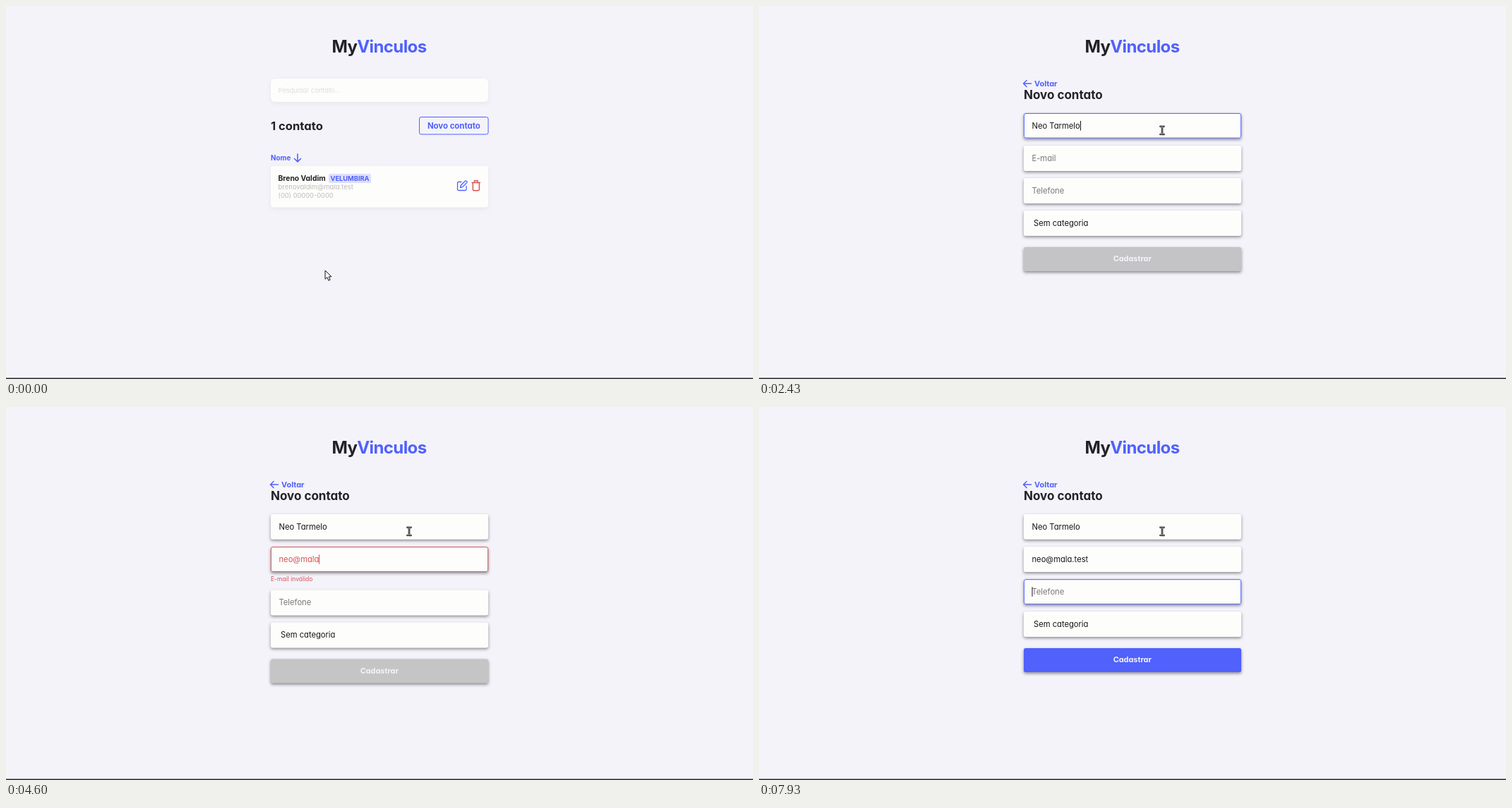
Recreate the animation shown at these times as an HTML page. Size 1058 by 529 pixels, loop 8 s.

```html
<!DOCTYPE html>
<html lang="pt-BR">
<head>
<meta charset="utf-8">
<title>Contatos</title>
<style>
  html, body { margin: 0; width: 100%; height: 100%; overflow: hidden; background: #f4f3fa; }
  svg { display: block; width: 1058px; height: 529px; }
  text { font-family: Inter, sans-serif; font-feature-settings: "cv11"; white-space: pre; }
  .raised { filter: drop-shadow(0 2px 2.3px rgba(0, 0, 0, .45)); }
  .soft { filter: drop-shadow(0 2px 3px rgba(0, 0, 0, .06)); }
  .line { fill: none; stroke-linecap: round; stroke-linejoin: round; }
</style>
</head>
<body>
<svg id="stage" viewBox="0 0 1058 529"></svg>
<script>
const LOOP = 8000;
const BLUE = [80, 97, 252], RED = [216, 82, 86], GRAY = [197, 197, 198], WHITE = [253, 253, 251];
const INK = '#222226', HINT = '#777', PAGE = '#f4f3fa';
const NAME = 'Neo Tarmelo', EMAIL = 'neo@mala.test';

// Moments of the interaction, in ms
const HOVER = 840, STATUS_ON = 930, OPEN = 1400, LOADED = 1780, STATUS_OFF = 1850;
const FOCUS_NAME = 1990, NAME_DONE = 2430, FOCUS_EMAIL = 2900;
const INVALID = 3460, VALID = 5230, FOCUS_PHONE = 7440;

const stage = document.getElementById('stage');
const rgb = c => `rgb(${c.map(Math.round)})`;
const mix = (a, b, k) => a.map((v, i) => v + (b[i] - v) * k);
const progress = (t, start, length) => Math.min(1, Math.max(0, (t - start) / length));
const fade = (t, start) => 1 - (1 - progress(t, start, 200)) ** 2;

const text = (x, y, size, fill, str, weight = 400, extra = '') =>
  `<text x="${x}" y="${y}" font-size="${size}" font-weight="${weight}" fill="${fill}" ${extra}>${str}</text>`;
const rect = (x, y, w, h, fill, extra = '') =>
  `<rect x="${x}" y="${y}" width="${w}" height="${h}" fill="${fill}" ${extra}/>`;
const line = (d, color, width, extra = '') =>
  `<path class="line" d="${d}" stroke="${color}" stroke-width="${width}" ${extra}/>`;

const keyTimes = {
  name: [...NAME].map((_, i) => 2060 + i * 34),
  email: [...EMAIL].map((_, i) => i < 8 ? INVALID + i * 140 : 4750 + (i - 8) * 120)
};
function typed(t, str, times) {
  const count = times.filter(k => k <= t).length;
  return { value: str.slice(0, count), last: count ? times[count - 1] : 0 };
}

function header() {
  return text(528.5, 66, 24, INK, `My<tspan fill="${rgb(BLUE)}">Vinculos</tspan>`, 700,
    'text-anchor="middle" letter-spacing="-.6"');
}

function listPage(t) {
  const blue = rgb(BLUE), red = rgb(RED), white = rgb(WHITE), hover = fade(t, HOVER);
  return rect(375, 103, 308, 33, white, 'rx="6" class="soft"') +
    text(385.5, 123, 9.3, '#deded9', 'Pesquisar contato...') +
    text(375, 176, 16.6, INK, '1 contato', 700) +
    rect(585.5, 157.5, 97.5, 24.5, rgb(mix([244, 243, 250], BLUE, hover)), `rx="2.5" stroke="${blue}"`) +
    text(634.3, 173.5, 11.4, rgb(mix(BLUE, WHITE, hover)), 'Novo contato', 700, 'text-anchor="middle"') +
    text(375, 219, 9.8, blue, 'Nome', 700) +
    line('M413 210v11m-4.5-4.5 4.5 4.5 4.5-4.5', blue, 1.6) +
    rect(375, 227, 308, 58.5, white, 'rx="4" class="soft"') +
    text(385.5, 248, 10.3, INK, 'Breno Valdim', 700) +
    rect(457, 238, 60, 13, '#dedffa', 'rx="2.5"') +
    text(487, 247.8, 9.3, blue, 'VELUMBIRA', 700, 'text-anchor="middle"') +
    text(385.5, 260.3, 9.5, '#bcbcbc', 'brenovaldim@mala.test') +
    text(385.5, 272, 9.3, '#bcbcbc', '(00) 00000-0000') +
    line('M645 249.5h-4q-1.500 0-1.500 1.500v9q0 1.500 1.500 1.500h9.500q1.500 0 1.500-1.500v-4.500' +
      'M643.500 257.500l.8-3.300 6-6q1.200-.8 2.200.2t.2 2.200l-6 6z', blue, 1.3) +
    line('M660 250.500h11.500M663.500 250v-2.200h4.600v2.200M661.300 250.500v9.500q0 1.800 1.800 1.800h5.400q1.800 0 1.800-1.800v-9.500', red, 1.4);
}

function field(y, str, color, border, x = 386.5, fill = rgb(WHITE), id = '') {
  return rect(375, y, 308, 35.5, fill, 'rx="2.5" class="raised"') +
    rect(375.4, y + .4, 307.2, 34.7, 'none', `rx="2.5" stroke="${rgb(border)}"`) +
    text(x, y + 21.6, 11.2, color, str, 400, id && `id="${id}"`);
}

function formPage(t) {
  const blue = rgb(BLUE), red = rgb(RED);
  const name = typed(t, NAME, keyTimes.name), email = typed(t, EMAIL, keyTimes.email);
  const invalid = t >= INVALID && t < VALID, shift = invalid ? 15.5 : 0;
  const focus = t >= FOCUS_PHONE ? 'phone' : t >= FOCUS_EMAIL ? 'email' : t >= FOCUS_NAME ? 'name' : '';
  const id = key => focus === key ? 'active' : '';

  const nameBorder = mix(WHITE, BLUE, fade(t, FOCUS_NAME) - fade(t, FOCUS_EMAIL));
  const emailTint = mix(BLUE, RED, fade(t, INVALID) - fade(t, VALID));
  const emailBorder = mix(WHITE, emailTint, fade(t, FOCUS_EMAIL) - fade(t, FOCUS_PHONE));
  const phoneBorder = mix(WHITE, BLUE, fade(t, FOCUS_PHONE));
  const button = mix(GRAY, BLUE, fade(t, NAME_DONE) - fade(t, INVALID) + fade(t, VALID));

  const loading = t < LOADED;
  const angle = (t - 1530) * .36;
  const emailColor = invalid ? red : email.value ? '#151515' : HINT;
  const value = { name: name.value, email: email.value, phone: '' }[focus];
  const caretY = { name: 152, email: 198.3, phone: 244.3 }[focus];
  const caretStart = Math.max({ name: FOCUS_NAME, email: FOCUS_EMAIL, phone: FOCUS_PHONE }[focus],
    focus === 'name' ? name.last : focus === 'email' ? email.last : 0);
  const caretOn = focus && (t - caretStart) % 1000 < 500;

  return line('M385.500 110h-11m4.500-4.500-4.500 4.500 4.500 4.500', blue, 1.5) +
    text(390, 113.5, 10.9, blue, 'Voltar', 700) +
    text(375, 132, 17, INK, 'Novo contato', 700) +
    field(152, name.value || 'Nome *', name.value ? '#151515' : HINT, nameBorder, 386.5, undefined, id('name')) +
    field(198.3, email.value || 'E-mail', emailColor, emailBorder, 386.5, undefined, id('email')) +
    (invalid ? text(375, 247, 8.5, red, 'E-mail inválido') : '') +
    field(244.3 + shift, 'Telefone', HINT, phoneBorder, 386.5, undefined, id('phone')) +
    field(290.3 + shift, 'Sem categoria', loading ? '#6c6c6c' : '#151515',
      loading ? [207, 207, 200] : WHITE, 389, loading ? '#e2e2e2' : undefined) +
    (loading ? `<circle cx="667" cy="298.300" r=".9" fill="#555" transform="rotate(${angle} 667 307.500)"/>` : '') +
    rect(375, 342 + shift, 308, 34, rgb(button), 'rx="2.5" class="raised"') +
    text(528.8, 362.3 + shift, 10.9, PAGE, 'Cadastrar', 700, 'text-anchor="middle"') +
    (caretOn ? rect(386.5, caretY + 11, 1, 13.5, invalid ? red : '#111',
      `id="caret" data-empty="${value ? '' : 1}"`) : '');
}

function pointer(t) {
  const ease = p => p * p * (3 - 2 * p);
  const reach = ease(progress(t, 30, 900)), settle = ease(progress(t, 1720, 240));
  const x = 452 + 151 * reach - 32 * settle, y = 375 - 203 * reach + 4 * settle;
  let shape;
  if (t < HOVER) {
    shape = '<path d="M0 0v12.300l2.900-2.600 2 4.600 2.200-1-2-4.400h3.900z" fill="#fff" stroke="#111" stroke-linejoin="round"/>';
  } else if (t < OPEN) {
    shape = '<path d="M-1 7v-6.500q1-1.500 2 0v4.500q3-.8 7 1v4q0 2-1 4h-6l-4.500-5q-.5-2 2-1z" fill="#fff" stroke="#111" stroke-linejoin="round"/>';
  } else {
    const beam = 'M-2.500-5.300q2.500 0 2.500 1.300 0-1.300 2.500-1.300M0-4v9M-2.500 6q2.500 0 2.500-1.300 0 1.300 2.500 1.300';
    shape = line(beam, '#151515', 2.6) + line(beam, '#ddd', .7);
  }
  return `<g transform="translate(${x} ${y})">${shape}</g>`;
}

function statusBar(t) {
  const shown = t >= STATUS_ON && t < STATUS_OFF;
  return rect(0, 527.4, 1058, 1.6, '#303036') + (shown
    ? '<path d="M0 513h91q3 0 3 3v11.500h-94z" fill="#68676e"/>' +
      text(3, 523.8, 9, '#e4e4e6', 'localhost:3000/new', 400, 'style="font-family:\'DejaVu Sans\',sans-serif"')
    : '');
}

function render() {
  const t = performance.now() % LOOP;
  stage.innerHTML = rect(0, 0, 1058, 529, PAGE) + header() +
    (t < OPEN ? listPage(t) : formPage(t)) + statusBar(t) + pointer(t);
  const caret = document.getElementById('caret');
  if (caret && !caret.dataset.empty) {
    const width = document.getElementById('active').getComputedTextLength();
    caret.setAttribute('x', Math.round(386.5 + width));
  }
  requestAnimationFrame(render);
}
render();
</script>
</body>
</html>
```
